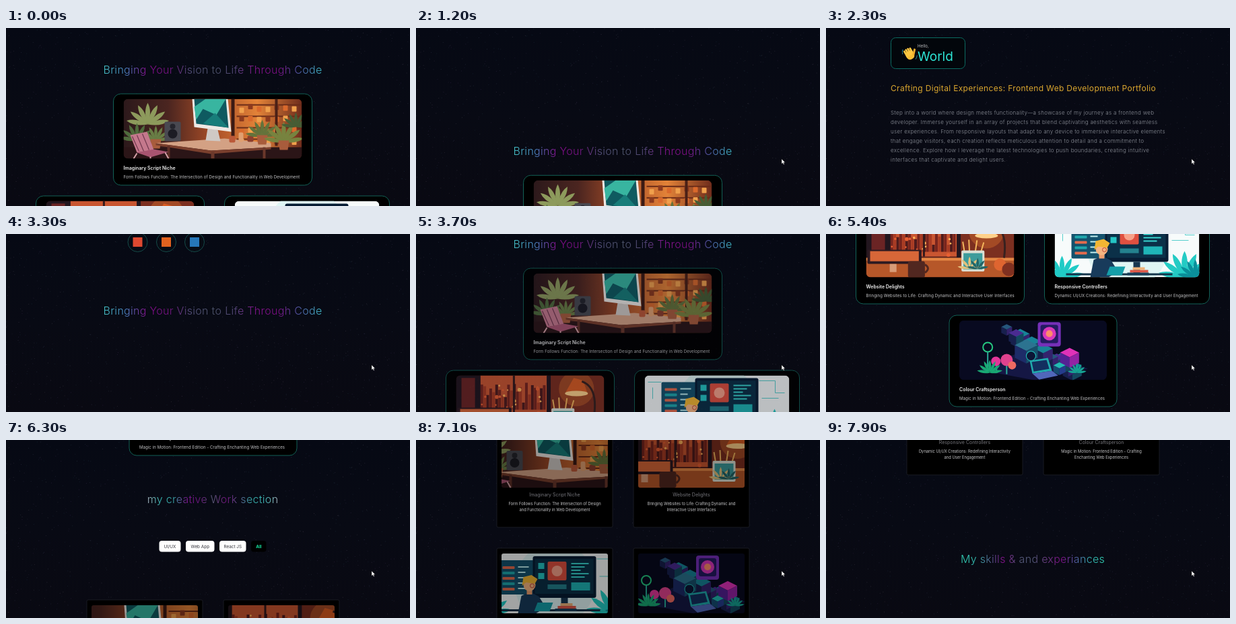
These frames come from a looping animation (600x265 px, 8 s). An HTML page:

```html
<!DOCTYPE html>
<html lang="en">
<head>
<meta charset="utf-8">
<title>Portfolio scroll</title>
<style>
  html, body { margin: 0; width: 100%; height: 100%; overflow: hidden; background: #060914; }
  svg { display: block; }
  text { font-family: Inter, "Open Sans", sans-serif; }
  .title { font-size: 16px; font-weight: 300; letter-spacing: .3px; text-anchor: middle; }
  .lead { font-size: 12px; letter-spacing: .33px; fill: #dba72f; }
  .body { font-size: 8px; font-weight: 300; letter-spacing: .31px; fill: #8c9099; }
  .name { font-size: 7px; font-weight: 600; fill: #f2f2f2; }
  .desc { font-size: 6px; letter-spacing: .11px; fill: #c6c6c8; }
  .work-name { font-size: 7px; fill: #74747a; text-anchor: middle; }
  .work-desc { font-size: 5.8px; fill: #c6c6c8; text-anchor: middle; }
  .button { font-size: 6.4px; text-anchor: middle; }
</style>
</head>
<body>
<svg id="stage" width="600" height="265" viewBox="0 0 600 265"></svg>
<script>
const LOOP = 8000, STEP = 100;

// Drawing helpers
const rect = (x, y, w, h, fill, r = 0, extra = '') =>
  `<rect x="${x}" y="${y}" width="${w}" height="${h}" rx="${r}" fill="${fill}" ${extra}/>`;
const circle = (x, y, r, fill, extra = '') => `<circle cx="${x}" cy="${y}" r="${r}" fill="${fill}" ${extra}/>`;
const poly = (points, fill) => `<polygon points="${points}" fill="${fill}"/>`;
const line = (d, stroke, width = 1) => `<path d="${d}" fill="none" stroke="${stroke}" stroke-width="${width}"/>`;
const text = (cls, x, y, content, extra = '') => `<text class="${cls}" x="${x}" y="${y}" ${extra}>${content}</text>`;
const group = (id, content) => `<g id="${id}">${content}</g>`;
const gradient = (id, colors, vertical) =>
  `<linearGradient id="${id}" ${vertical ? 'x2="0" y2="1"' : ''}>` +
  colors.map((c, i) => `<stop offset="${i / (colors.length - 1)}" stop-color="${c}"/>`).join('') +
  '</linearGradient>';

let seed = 7;
const random = () => (seed = seed * 16807 % 2147483647) / 2147483647;

function stars() {
  return ['#5b6a86', '#6a4a86', '#8d8494', '#356070'].map(color => {
    let d = '';
    for (let i = 0; i < 210; i++) d += `M${(random() * 600).toFixed(1)} ${(random() * 265).toFixed(1)}h.9v.9h-.9z`;
    return `<path d="${d}" fill="${color}" opacity=".24"/>`;
  }).join('');
}

// A fan of leaves growing from one point
function plant(x, y, size, color, count = 7) {
  let out = '';
  for (let i = 0; i < count; i++) {
    const angle = -80 + 160 * i / (count - 1);
    out += `<path transform="translate(${x} ${y}) rotate(${angle})" fill="${color}"
      d="M0 0Q${-size * .22} ${-size * .6} 0 ${-size}Q${size * .22} ${-size * .6} 0 0"/>`;
  }
  return out;
}
const potted = (x, y, size, color) => plant(x, y, size, color) +
  poly(`${x - 8},${y - 2} ${x + 8},${y - 2} ${x + 6},${y + 12} ${x - 6},${y + 12}`, '#a85c3c');

function deskPicture() {
  let shelves = '';
  for (let i = 0; i < 4; i++) {
    shelves += rect(168, 8 + i * 17, 97, 2, '#6b2c18');
    for (let k = 0; k < 7; k++)
      shelves += rect(172 + k * 13, 17 + i * 17 - 4 - random() * 6, 7, 8, ['#f0a04c', '#8c3a1e', '#d9692c'][(i + k) % 3], 1);
  }
  return rect(0, 0, 265, 89, 'url(#warm)') + shelves +
    rect(160, 0, 5, 70, '#3b1a14') + rect(225, 0, 4, 70, '#4a2016') +
    rect(0, 72, 265, 17, '#2b1517') +
    plant(36, 38, 32, '#8d9a5c') + plant(20, 62, 26, '#4f6b3c') + potted(48, 62, 22, '#687d45') +
    rect(61, 34, 24, 29, '#494951', 2) + circle(73, 52, 7, '#1c1c24') + circle(73, 41, 4, '#25252d') +
    poly('48,66 150,59 219,66 219,72 130,77', '#d3a184') + poly('48,66 130,77 219,72 219,75 130,82 48,69', '#7a3f2d') +
    rect(65, 70, 4, 19, '#5c2e26') + rect(130, 79, 5, 10, '#6b382b') + rect(207, 72, 4, 17, '#6b382b') +
    poly('125,44 140,46 144,63 122,62', '#cfc9c5') +
    poly('102,0 155,0 160,49 105,42', '#eee9e4') + poly('105,0 152,0 156,43 108,37', '#0f5a60') +
    poly('105,12 122,0 152,0 138,24 118,15 108,31', '#38b5a0') + poly('118,37 136,21 156,43', '#187d7a') +
    rect(157, 55, 9, 10, '#bb5838', 2) + rect(171, 50, 7, 14, '#e0a071', 2) + rect(184, 55, 9, 9, '#8c3e2d', 2) +
    potted(206, 56, 25, '#63733b') + potted(238, 64, 30, '#77833f') + plant(256, 42, 22, '#465d35') +
    poly('10,54 35,49 45,76 20,80', '#c4788c') + poly('20,80 45,75 67,79 40,87', '#a85470') +
    line('M13 56L23 78M20 54L30 78M28 52L38 76', '#70384e', 1.2) + line('M40 86V89M20 81L15 89M62 80L67 89', '#d3a0a6', 2);
}

function studioPicture() {
  let city = '', mist = '';
  for (let i = 0; i < 22; i++) {
    const h = 8 + random() * 32;
    city += rect(36 + i * 4.4, 51 - h, 4, h, ['#78251e', '#a83b24', '#4f1b1c'][i % 3]);
    mist += circle(38 + random() * 94, 15 + random() * 46, 1 + random() * 2, ['#ffb25a', '#e85f32'][i % 2]);
  }
  return rect(0, 0, 219, 89, '#5a211b') + rect(36, 0, 99, 58, '#c95631') + city + mist +
    rect(0, 0, 36, 60, '#22161e') + rect(8, 4, 20, 50, '#6b2424') + rect(134, 0, 6, 60, '#22161f') +
    rect(140, 0, 79, 62, '#7c2f20') + rect(84, 0, 3, 58, '#341a1c') +
    rect(0, 60, 219, 29, '#b65729') + rect(0, 60, 219, 4, '#e58745') +
    rect(2, 48, 80, 21, '#2d1a21', 2) + rect(6, 50, 72, 15, '#d76738') + rect(35, 69, 10, 12, '#d89c78') +
    circle(178, 20, 26, '#ec7d2e', 'opacity=".35"') + poly('162,25 174,4 188,8 195,29', '#d95c23') +
    line('M186 9Q210 18 204 60', '#38211f', 3) + `<ellipse cx="178" cy="27" rx="17" ry="4" fill="#ffd18a"/>` +
    line('M146 54L143 36M153 54L152 33M161 54L164 34M169 54L174 37', '#f3b65c', 2) +
    rect(141, 49, 34, 31, '#dbe0d5', 2) + rect(144, 53, 28, 24, '#3d9c9b') +
    plant(153, 76, 18, '#e4c17c', 5) + plant(165, 76, 16, '#246466', 5) +
    rect(62, 65, 25, 24, '#512720', 3) + line('M87 70q9 5 0 12', '#512720', 3) +
    circle(198, 70, 9, '#df6530') + circle(211, 77, 10, '#803020');
}

function interfacePicture() {
  let lines = '';
  for (let i = 0; i < 5; i++) {
    lines += rect(132, 14 + i * 5, 26 - i % 3 * 6, 2, '#39d6d0');
    lines += rect(30, 19 + i * 8, 18, 4, i % 2 ? '#1fa8ad' : '#e46b4d', 1);
    lines += rect(53, 19 + i * 8, 16 - i % 2 * 5, 2, '#bfeef0');
  }
  return rect(0, 0, 215, 89, '#f7fbfb') + circle(108, 45, 60, '#dff5f4') +
    line('M5 10H25M12 18V35M170 8h24v18h14M174 34h25', '#57cfcd', 1) +
    plant(11, 89, 32, '#20cbc6') + plant(193, 89, 39, '#23cbc4') + plant(209, 89, 27, '#0a8f9a') +
    rect(25, 10, 52, 51, '#14526d', 2) + rect(75, 4, 94, 62, '#071c34', 3) + rect(78, 8, 87, 52, '#0b3048') +
    rect(97, 12, 28, 28, '#e05040', 2) + circle(111, 26, 8, '#f7a28a') + rect(83, 14, 9, 9, '#25c6c5') +
    rect(83, 29, 9, 9, '#25c6c5') + lines + rect(97, 46, 28, 7, '#24828e') + rect(132, 43, 28, 12, '#1fb5b7') +
    rect(117, 66, 10, 17, '#173650') + rect(17, 83, 158, 3, '#14344a') +
    poly('53,89 58,63 71,57 84,64 94,80 80,89', '#183b5b') + rect(66, 50, 8, 11, '#efa06f') +
    circle(70, 47, 9, '#f5b582') + poly('59,48 61,35 73,32 82,38 78,45 65,43', '#f2b633') +
    circle(74, 48, 3, 'none', 'stroke="#c04433"') +
    poly('82,73 105,73 100,86 77,86', '#159fa9') +
    rect(112, 78, 27, 4, '#de5849') + rect(108, 82, 32, 4, '#173e59') + rect(116, 74, 18, 4, '#efb37a');
}

function cubesPicture() {
  const cube = (x, y, s, top, left, right) =>
    poly(`${x},${y} ${x + s},${y - s / 2} ${x + 2 * s},${y} ${x + s},${y + s / 2}`, top) +
    poly(`${x},${y} ${x + s},${y + s / 2} ${x + s},${y + s * 1.6} ${x},${y + s * 1.1}`, left) +
    poly(`${x + 2 * s},${y} ${x + s},${y + s / 2} ${x + s},${y + s * 1.6} ${x + 2 * s},${y + s * 1.1}`, right);
  let blocks = '';
  for (let i = 0; i < 16; i++)
    blocks += cube(62 + i * 37 % 94, 10 + i * 23 % 58, 8 + i % 3 * 3,
      ['#25567c', '#4a2b91', '#188397'][i % 3], '#17204d', ['#34236d', '#13485f'][i % 2]);
  return rect(0, 0, 218, 89, '#080a20') + poly('30,74 110,38 190,72 112,89', '#151744') + blocks +
    cube(82, 37, 17, '#2c7390', '#1d2c68', '#17516c') + circle(106, 53, 7, '#0c1636', 'stroke="#22c6be"') +
    rect(116, 3, 34, 36, '#7630b9', 4) + rect(120, 7, 26, 27, '#241b62', 3) +
    circle(133, 20, 10, '#d938bb') + circle(133, 20, 5, '#ff8c69') +
    cube(149, 48, 14, '#df32b8', '#542193', '#9423a4') + cube(139, 67, 9, '#23b9b2', '#164c72', '#253c8c') +
    poly('104,60 131,56 137,75 108,79', '#20aaad') + poly('107,62 129,59 133,72 110,76', '#132f5f') +
    poly('108,79 137,75 146,82 118,88', '#5067bb') +
    circle(42, 40, 7, 'none', 'stroke="#25c780" stroke-width="2"') + line('M42 47V76M55 62V78M70 58V80', '#2aac98', 2) +
    circle(54, 61, 7, '#e23699') + circle(70, 59, 9, '#e0428e') + circle(78, 67, 6, '#ef6a62') +
    plant(45, 78, 19, '#19a974') + plant(174, 78, 14, '#16a493');
}

const pictures = { desk: [265, deskPicture], studio: [219, studioPicture], panel: [215, interfacePicture], cubes: [218, cubesPicture] };
const projects = {
  desk: ['Imaginary Script Niche', 'Form Follows Function: The Intersection of Design', 'and Functionality in Web Development'],
  studio: ['Website Delights', 'Bringing Websites to Life: Crafting Dynamic and', 'Interactive User Interfaces'],
  panel: ['Responsive Controllers', 'Dynamic UI/UX Creations: Redefining Interactivity', 'and User Engagement'],
  cubes: ['Colour Craftsperson', 'Magic in Motion: Frontend Edition - Crafting', 'Enchanting Web Experiences']
};

let clips = 0;
function picture(kind, x, y, w, h, radius, opacity = 1) {
  const id = 'clip' + clips++;
  return `<clipPath id="${id}">${rect(x, y, w, h, '#000', radius)}</clipPath><g clip-path="url(#${id})" opacity="${opacity}">` +
    `<use href="#${kind}" x="${x}" y="${y}" width="${w}" height="${h}"/></g>`;
}

function card(kind, x, y, w) {
  const [name, ...desc] = projects[kind];
  return rect(x + .5, y + .5, w - 1, 136, '#000', 11, 'stroke="#126156"') +
    picture(kind, x + 15.5, y + 8, w - 31, 89, 7) +
    text('name', x + 15.5, y + 113.5, name) + text('desc', x + 15.5, y + 126, desc.join(' '));
}

function workCard(kind, x, y) {
  const [name, first, second] = projects[kind];
  return rect(x, y, 172, 156, '#000', 2, 'stroke="#191b23"') + picture(kind, x + 7, y + 8, 158, 89, 3, .65) +
    text('work-name', x + 86, y + 110, name) +
    text('work-desc', x + 86, y + 122.5, first) + text('work-desc', x + 86, y + 131.5, second);
}

function button(x, w, label, active) {
  return rect(x, 666, w, 16.5, active ? '#000' : '#fff', 4) +
    text('button', x + w / 2, 676.6, label, active ? 'fill="#18e6a2" font-weight="700"' : 'fill="#34343c"');
}

const heading = (y, content, fill = 'neon') => text('title', 307, y, content, `fill="url(#${fill})"`);
const logo = (x, color) => circle(x, -40, 14.5, '#070b14', 'stroke="#154b49"') + rect(x - 7, -47, 14, 14, color);

const hand = group('hand',
  rect(-6, -5, 12, 13, '#f6bd35', 5) +
  [-6, -2.8, .4, 3.6].map((x, i) => rect(x, -10 + Math.abs(i - 1.4), 2.8, 12, '#fbc740', 1.4)).join('') +
  `<g transform="rotate(42 6 3)">${rect(4, -5, 3, 10, '#eeac2b', 1.5)}</g>` +
  line('M-9 -5Q-8 -9 -5 -11M9 7Q7 10 4 11', '#2e9ab0', .9));

const paragraph = [
  'Step into a world where design meets functionality—a showcase of my journey as a frontend web',
  'developer. Immerse yourself in an array of projects that blend captivating aesthetics with seamless',
  'user experiences. From responsive layouts that adapt to any device to immersive interactive elements',
  'that engage visitors, each creation reflects meticulous attention to detail and a commitment to',
  'excellence. Explore how I leverage the latest technologies to push boundaries, creating intuitive',
  'interfaces that captivate and delight users.'
];
const hero = rect(96.5, -258.5, 110, 46, '#02060b', 7, 'stroke="#0b6a60"') + hand +
  text('desc', 136, -244.5, 'Hello,') + text('', 136, -224, 'World', 'font-size="19" fill="#2ee6d6"') +
  text('lead', 96, -179, 'Crafting Digital Experiences: Frontend Web Development Portfolio') +
  paragraph.map((row, i) => text('body', 96, -144 + i * 14, row)).join('');

const stage = document.getElementById('stage');
stage.innerHTML = '<defs>' +
  gradient('neon', ['#45c4c7', '#4b86c4', '#850b8c', '#71127e', '#53507a', '#4b5268', '#54497a', '#85128f', '#780c80', '#5060ab', '#40bdcb']) +
  gradient('work', ['#a9b2bd', '#37b9b4', '#3aa9ab', '#77188c', '#6d1680', '#595a78', '#74117e', '#5d5388', '#35b2af', '#3fb8b8', '#a9b2bd']) +
  gradient('skills', ['#2fd0b4', '#35bfb4', '#506890', '#850b8c', '#575a7c', '#525978', '#6d3b85', '#820c89', '#545fa5', '#36b9b8', '#2fd0b4']) +
  gradient('warm', ['#2c191b', '#4b2520', '#a74d27', '#e38338', '#6e2c1c']) +
  gradient('shade', ['#060914', '#080a14', '#090912'], true) +
  Object.entries(pictures).map(([id, [w, draw]]) =>
    `<symbol id="${id}" viewBox="0 0 ${w} 89" preserveAspectRatio="xMidYMid slice">${draw()}</symbol>`).join('') + '</defs>' +
  rect(0, 0, 600, 265, 'url(#shade)') + stars() +
  group('page',
    group('hero', hero) + group('logos', logo(195.5, '#df4930') + logo(238, '#e2621f') + logo(280, '#2676b8')) +
    heading(68, 'Bringing Your Vision to Life Through Code') +
    group('cards', card('desk', 159, 97.5, 296) + card('studio', 44, 249.5, 251) + card('panel', 324, 249.5, 246)) +
    group('lastCard', card('cubes', 182.5, 402.5, 250)) +
    heading(609.5, 'my creative Work section', 'work') +
    button(227.5, 32, 'UI/UX') + button(267, 42.5, 'Web App') + button(317, 39.5, 'React JS') + button(364, 22.5, 'All', true) +
    workCard('desk', 120, 754) + workCard('studio', 323, 754) + workCard('panel', 120, 941) + workCard('cubes', 323, 941) +
    heading(1228, 'My skills &amp; and experiances', 'skills')) +
  group('cursor', '<path d="M0 0V7.2L1.7 5.7 2.9 8.3 4.1 7.7 2.9 5.2H5.2Z" fill="#fff" stroke="#222" stroke-width=".4"/>');

const part = id => document.getElementById(id);
const ramp = (t, from, to) => Math.min(1, Math.max(0, (t - from) / (to - from)));
const easeOut = k => 1 - (1 - k) ** 3;

// Scroll position over time: [ms, px]
const scrollKeys = [[0, 0], [800, 0], [1700, -273], [2600, -273], [3300, -52], [3500, 47], [4600, 47],
  [5100, 282], [5500, 282], [6200, 516], [6500, 516], [7300, 868], [7500, 868], [7900, 1045]];
const scrollAt = t => scrollKeys.slice(1).reduce((y, [end, value], i) => {
  const [start, previous] = scrollKeys[i];
  return y + (value - previous) * ramp(t, start, end);
}, 0);

function draw(t) {
  const arrive = easeOut(ramp(t, 1400, 2200));
  part('page').setAttribute('transform', `translate(0 ${-scrollAt(t)})`);
  part('hero').setAttribute('transform', `translate(${-77 * (1 - arrive)} 0)`);
  part('hero').setAttribute('opacity', arrive);
  part('hand').setAttribute('transform', `translate(124 -234) rotate(${-30 + 12 * Math.sin((t - 2300) / 150)})`);
  part('logos').setAttribute('opacity', ramp(t, 2300, 2700));
  part('cards').setAttribute('opacity', t < 1700 ? 1 : ramp(t, 3400, 3800));
  part('lastCard').setAttribute('opacity', ramp(t, 4700, 5200));
  part('cursor').setAttribute('transform', `translate(543 ${t < 900 ? 200 : 195})`);
  part('cursor').setAttribute('opacity', t < 400 ? 0 : 1);
}

const begin = performance.now();
function tick() {
  const t = (performance.now() - begin) % LOOP;
  draw(Math.floor(t / STEP) * STEP);
  requestAnimationFrame(tick);
}
tick();
</script>
</body>
</html>
```
